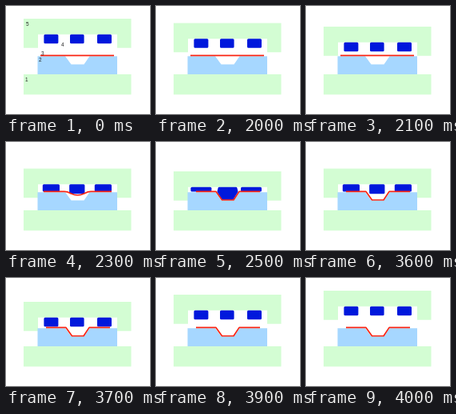
These frames come from a looping animation (180x136 px, 4100 ms). An HTML page:

```html
<!DOCTYPE html>
<html lang="en">
<head>
<meta charset="utf-8">
<title>Rubber pad forming</title>
<style>
  html, body { margin: 0; width: 100%; height: 100%; overflow: hidden; background: #fff; }
  svg { display: block; width: 100%; height: 100%; }
  text { font: 6.4px "Liberation Sans", Arial, sans-serif; fill: #222; }
</style>
</head>
<body>
<svg viewBox="0 0 180 136">
  <path fill="#d3fdd3" d="M22 86H156.5V111.5H22Z"/>
  <path id="ram" fill="#d3fdd3" d="M22 0H156.5V36.7H139V19.7H40V36.7H22Z"/>
  <path fill="#a6d7ff" d="M39.5 63.2H74L81.5 73.5H97.5L104.5 63.2H139V86H39.5Z"/>
  <g fill="#0018dc" stroke="#0018dc" stroke-width="3" stroke-linejoin="round">
    <path id="left"/><path id="mid"/><path id="right"/>
  </g>
  <path id="sheet" fill="none" stroke="#fa2412" stroke-width="1.7" stroke-linejoin="round"/>
  <g id="labels">
    <text x="24" y="95.3">1</text>
    <text x="41" y="70.3">2</text>
    <text x="44" y="61.6">3</text>
    <text x="69" y="50.6">4</text>
    <text x="25" y="25.3">5</text>
  </g>
</svg>
<script>
const LOOP = 4100, STEP = 100, PRESS = 2000, LIFT = 3500;
const REST = 16, ROOF = 19.8, PAD_W = 18, PAD_H = 11.5, FACE = 62.4;
const down = [21.5, 26, 30, 33.5, 35.5, 37];
const up = [36, 33.5, 30, 26, 21, REST];
const FLAT = "M43 62.3H135";
const FORMED = "M50 62.4H75L82.5 73H97L104 62.4H130";

const $ = id => document.getElementById(id);
const [ram, left, mid, right, sheet, labels] =
  ["ram", "left", "mid", "right", "sheet", "labels"].map($);
const draw = (el, d) => el.setAttribute("d", d);

// Half widths at the top, the die face and the bottom; inset for the round stroke.
function pad(cx, top, bottom, a, b = a, c = a) {
  const t = top + 1.5, u = bottom - 1.5, m = b === a ? (t + u) / 2 : FACE;
  const [p, q, r] = [a, b, c].map(v => v - 1.5);
  return `M${cx - p} ${t}H${cx + p}L${cx + q} ${m}L${cx + r} ${u}H${cx - r}L${cx - q} ${m}Z`;
}

function sagging(depth, pull) {
  const y = 62.4 + depth;
  return `M${43 + pull} 62.4H73C80 62.4 82 ${y} 89.5 ${y}S99 62.4 106 62.4H${135 - pull * 0.75}`;
}

function render(t) {
  const pressing = t >= PRESS && t < LIFT;
  const start = pressing ? PRESS : LIFT;
  const i = Math.min(5, Math.floor((t - start) / STEP));
  const top = t < PRESS ? REST : (pressing ? down : up)[i];
  const roof = top + ROOF;
  const h = Math.min(PAD_H, FACE - roof);
  const w = Math.min(26, PAD_W * (PAD_H / h) ** 0.7);

  ram.setAttribute("transform", `translate(0 ${top})`);
  labels.setAttribute("visibility", t < PRESS ? "visible" : "hidden");
  draw(left, pad(56.4, roof, roof + h, w / 2));
  draw(right, pad(132 - w / 2, roof, roof + h, w / 2));

  if (pressing && i === 5) {
    draw(mid, pad(89.5, roof, 73, 12, 13, 7.5));
  } else if (pressing && i === 4) {
    draw(mid, pad(89.2, roof, 70.5, 10.5, 10.8, 7.5));
  } else {
    const squash = PAD_H - h;
    draw(mid, pad(88.8, roof, roof + PAD_H + squash * 0.2, 8.8 + squash * 0.35));
  }

  if (t < PRESS || pressing && i < 3) draw(sheet, FLAT);
  else if (pressing && i < 5) draw(sheet, i === 3 ? sagging(4.6, 4) : sagging(8.2, 5.5));
  else draw(sheet, FORMED);
}

const begin = performance.now();
function tick() {
  render((performance.now() - begin) % LOOP);
  requestAnimationFrame(tick);
}
tick();
</script>
</body>
</html>
```
